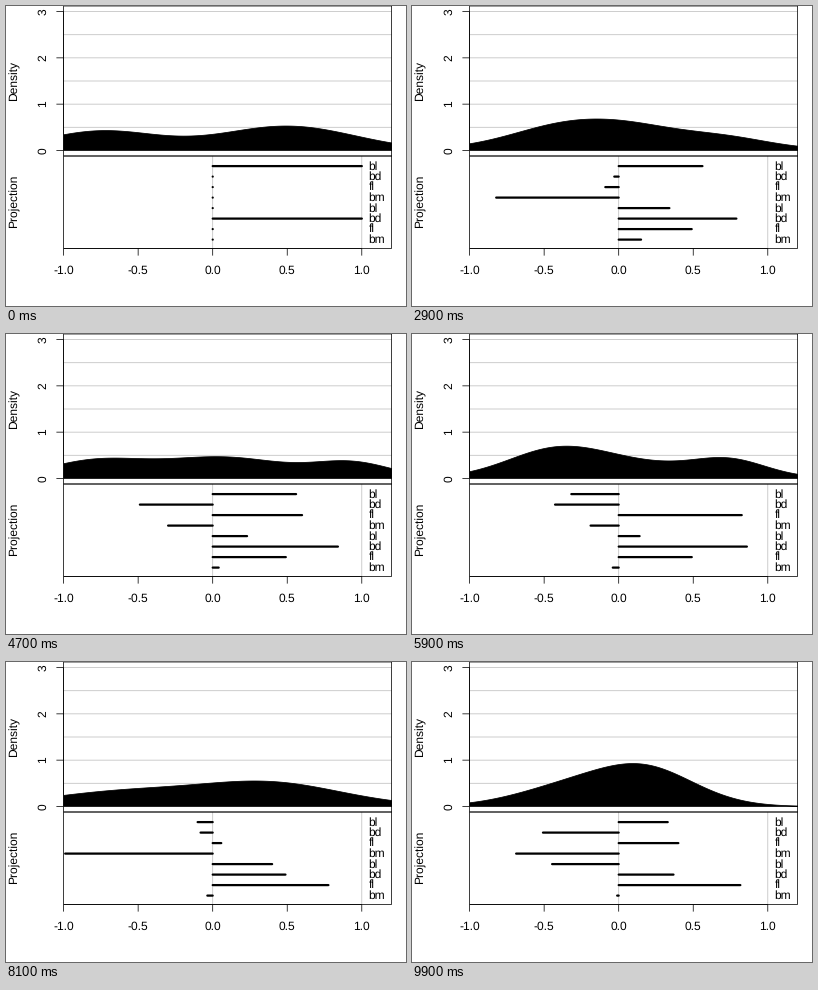
A matplotlib script that plays this animation: 400x300 px, repeating every 10000 ms.

```python
import numpy as np
import matplotlib.pyplot as plt
from matplotlib.animation import FuncAnimation
from matplotlib.collections import LineCollection
from matplotlib.patches import Polygon, Rectangle

W, H, DPI = 400, 300, 100
FRAMES, INTERVAL = 100, 100
PT = 72 / DPI  # points per pixel
LEFT, RIGHT, SPLIT, BOTTOM = 57.6, 385.6, 150, 242.4
THIN, THICK = .75 * PT, 2.25 * PT
GRID = "#bebebe"
plt.rcParams.update({"font.family": "Liberation Sans", "text.hinting": "none",
                     "path.snap": False})

# Key poses of the tour: frame -> two orthonormal directions in four variables
POSES = {
    0: np.eye(2, 4),
    17: [[.63, -.37, .32, -.60], [-.32, .55, .71, -.30]],
    29: [[.56, -.03, -.09, -.82], [.34, .79, .49, .15]],
    47: [[.56, -.49, .60, -.30], [.23, .84, .49, .04]],
    59: [[-.32, -.43, .83, -.19], [.14, .86, .49, -.04]],
    81: [[-.10, -.08, .06, -.99], [.40, .49, .78, -.04]],
    99: [[.33, -.51, .40, -.69], [-.45, .37, .82, -.01]],
}

# The data as three normal clusters: weight, correlation, means, deviations
CLUSTERS = [
    (.44, .44, np.array([-.94, .61, -.78, -.62]), [.49, .62, .47, .57]),
    (.20, .57, np.array([.90, .64, -.36, -.58]), [.61, .58, .51, .48]),
    (.36, .68, np.array([.66, -1.10, 1.16, 1.09]), [.56, .50, .46, .63]),
]
SCALE, BANDWIDTH = 1.35, .1


def spline(xk, yk, x):
    """Natural cubic spline through the rows of yk."""
    n, h = len(xk), np.diff(xk)
    a, rhs = np.eye(n), np.zeros(yk.shape)
    for i in range(1, n - 1):
        a[i, i - 1:i + 2] = h[i - 1], 2 * (h[i - 1] + h[i]), h[i]
        rhs[i] = 6 * ((yk[i + 1] - yk[i]) / h[i] - (yk[i] - yk[i - 1]) / h[i - 1])
    m = np.linalg.solve(a, rhs)
    i = np.clip(np.searchsorted(xk, x, "right") - 1, 0, n - 2)
    step = h[i][:, None]
    p = (xk[i + 1] - x)[:, None] / step
    q = 1 - p
    bend = (p**3 - p) * m[i] + (q**3 - q) * m[i + 1]
    return p * yk[i] + q * yk[i + 1] + bend * step**2 / 6


def orthonormal(flat):
    u, _, vt = np.linalg.svd(flat.reshape(2, 4), full_matrices=False)
    return u @ vt


def density(basis, x):
    """Density of the data projected on both directions together."""
    total = np.zeros_like(x)
    for weight, rho, mean, sd in CLUSTERS:
        cov = np.outer(sd, sd) * (rho + (1 - rho) * np.eye(4))
        for d in basis:
            mu = d @ mean / SCALE
            var = d @ cov @ d / SCALE**2 + BANDWIDTH**2
            total += weight / 2 * np.exp(-(x - mu)**2 / (2 * var)) / np.sqrt(2 * np.pi * var)
    return total


def px(x):
    return LEFT + (x + 1) * (RIGHT - LEFT) / 2.2


def py(d):
    return SPLIT * (3.12 - d) / 3.24


stops = np.array(list(POSES), float)
poses = np.array([np.ravel(p) for p in POSES.values()])
path = [orthonormal(b) for b in spline(stops, poses, np.arange(FRAMES))]
xs = np.linspace(-1.02, 1.22, 225)

fig = plt.figure(figsize=(W / DPI, H / DPI), dpi=DPI, facecolor="white")
ax = fig.add_axes([0, 0, 1, 1])
ax.set(xlim=(0, W), ylim=(H, 0))
ax.axis("off")


def line(x, y, color="black", z=3):
    ax.plot(x, y, color=color, lw=THIN, solid_capstyle="butt", zorder=z, snap=False)


def label(x, y, s, ha="center", rotation=0):
    ax.text(x, y, s, fontsize=12 * PT, ha=ha, va="baseline",
            rotation=rotation, rotation_mode="anchor")


for level in np.arange(.5, 3.1, .5):
    line([LEFT, RIGHT], [py(level)] * 2, GRID, 1)
for v in (0, 1):
    line([px(v)] * 2, [SPLIT, BOTTOM], GRID, 1)

for top, bottom in ((0, SPLIT), (SPLIT, BOTTOM)):
    ax.add_patch(Rectangle((LEFT, top), RIGHT - LEFT, bottom - top,
                           fill=False, lw=THIN, zorder=4, snap=False))

line([LEFT] * 2, [py(0), py(3)])
for v in range(4):
    line([LEFT - 7.2, LEFT], [py(v)] * 2)
    label(40.3, py(v), str(v), rotation=90)
line([px(-1), px(1)], [BOTTOM] * 2)
for v in np.arange(-1, 1.1, .5):
    line([px(v)] * 2, [BOTTOM, BOTTOM + 7.2])
    label(px(v), 268.3, f"{v:.1f}")
label(11.4, 74.5, "Density", rotation=90)
label(11.4, 195.5, "Projection", rotation=90)

rows = 160.1 + 10.5 * np.arange(8)
for y, name in zip(rows, ["bl", "bd", "fl", "bm"] * 2):
    label(362.7, y + 3.4, name, ha="left")

area = Polygon([[0, 0]], closed=True, fc="black", ec="black", lw=THIN,
               zorder=2, snap=False)
ax.add_patch(area)
area.set_clip_path(Rectangle((LEFT, 0), RIGHT - LEFT, SPLIT, transform=ax.transData))
bars = LineCollection([], colors="black", linewidths=THICK,
                      capstyle="round", zorder=3, snap=False)
ax.add_collection(bars)


def update(k):
    base = [(px(xs[-1]), py(0)), (px(xs[0]), py(0))]
    area.set_xy(np.vstack([np.column_stack([px(xs), py(density(path[k], xs))]), base]))
    # the small offset keeps zero-length bars visible as dots
    bars.set_segments([[(px(0), y), (px(v) + .05, y)]
                       for y, v in zip(rows, path[k].ravel())])
    return area, bars


anim = FuncAnimation(fig, update, frames=FRAMES, interval=INTERVAL,
                     repeat=True, repeat_delay=0, blit=False)
plt.show()
```
